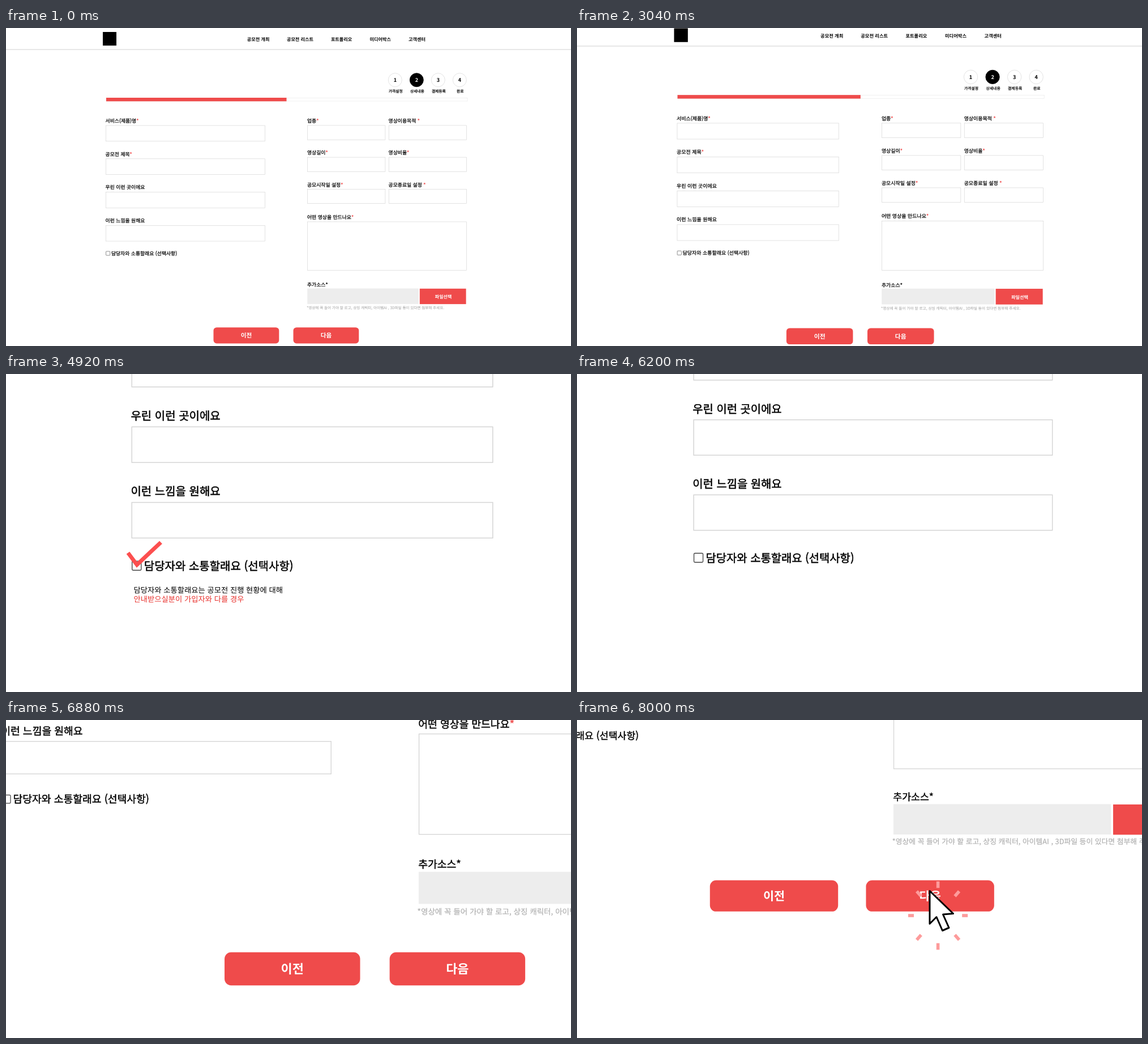
Animation, 998 px wide and 561 px high, one loop 8040 ms. Source, as an HTML page:

```html
<!DOCTYPE html>
<html lang="ko">
<head>
<meta charset="utf-8">
<title>공모전 상세내용</title>
<style>
  html, body { margin: 0; width: 100%; height: 100%; overflow: hidden; background: #fff; }
  svg { display: block; width: 100%; height: 100%; }
  text {
    font-family: "Noto Sans CJK KR", "Noto Sans CJK", "Noto Sans KR", "Noto Sans", sans-serif;
    text-rendering: geometricPrecision;
    white-space: pre;
  }
  .label { font-size: 8.82px; stroke: #000; stroke-width: .22px; }
  .label .req { fill: #ef4b4b; stroke: #ef4b4b; }
  .nav { font-size: 8.15px; font-weight: 700; text-anchor: middle; }
  .num { font-size: 9px; font-weight: 700; text-anchor: middle; }
  .step { font-size: 6.75px; text-anchor: middle; stroke: #000; stroke-width: .2px; }
  .note { font-size: 6.55px; fill: #b0b0b0; stroke: #b0b0b0; stroke-width: .1px; }
  .btn { font-size: 10.6px; font-weight: 700; text-anchor: middle; fill: #fff; }
  .file { font-size: 8px; font-weight: 700; text-anchor: middle; fill: #fff; }
  .hint { font-size: 13.32px; }
</style>
</head>
<body>
<svg viewBox="0 0 998 561">
  <g id="page"></g>
  <g id="memo">
    <path id="check" d="M215.5 315.5L231.3 336.5L273.5 297" fill="none" stroke="#fc4f4f"
      stroke-width="7" pathLength="1" stroke-dasharray="1 2"/>
    <text id="line1" class="hint" x="225.5" y="386.4"></text>
    <text id="line2" class="hint" x="225.5" y="402.4" fill="#e8302c"></text>
  </g>
  <g id="rays" fill="#fd9b9b"></g>
  <path id="cursor" d="M623 301.5V359.5L635 347.5L645.5 371.5L657 366.5L646.5 343L664.5 341.5Z"
    fill="#fff" stroke="#000" stroke-width="3" stroke-linejoin="round"/>
</svg>
<script>
const LOOP = 8040, TICK = 40, RED = '#ef4b4b';
const $ = id => document.getElementById(id);

function add(parent, tag, attrs, text) {
  const el = document.createElementNS('http://www.w3.org/2000/svg', tag);
  for (const k in attrs) el.setAttribute(k, attrs[k]);
  if (text) el.textContent = text;
  parent.append(el);
  return el;
}

const page = $('page');
const rect = (x, y, width, height, more) => add(page, 'rect', { x, y, width, height, ...more });
const write = (cls, x, y, s) => add(page, 'text', { class: cls, x, y }, s);
const field = (x, y, w, h) => rect(x, y, w, h, { fill: '#fff', stroke: '#d4d4d4', 'stroke-width': .65 });

// A trailing "*" marks a required field and is drawn in red.
function label(x, y, s) {
  const required = s.endsWith('*');
  const el = write('label', x, y, required ? s.slice(0, -1) : s);
  if (required) add(el, 'tspan', { class: 'req' }, '*');
}

function buildPage() {
  rect(0, 37.2, 998, 1.6, { fill: '#e2e2e2' });
  rect(171, 7, 24, 24, { fill: '#000' });
  [['공모전 개최', 445.6], ['공모전 리스트', 519.5], ['포트폴리오', 592.6], ['미디어박스', 661.2], ['고객센터', 726]]
    .forEach(([s, x]) => write('nav', x, 23.2, s));

  ['가격설정', '상세내용', '결제등록', '완료'].forEach((s, i) => {
    const cx = 687.3 + i * 38, on = i === 1;
    add(page, 'circle', { cx, cy: 91.7, r: 12, fill: on ? '#000' : '#fff', stroke: on ? '#000' : '#dcdcdc', 'stroke-width': .8 });
    add(page, 'text', { class: 'num', x: cx, y: 95.1, fill: on ? '#fff' : '#000' }, i + 1);
    write('step', cx + 1, 114.1, s);
  });

  rect(177, 123.4, 638, 5.6, { fill: '#fff', stroke: '#e6e6e6', 'stroke-width': .6 });
  rect(177, 123, 318.5, 6.3, { fill: RED });

  ['서비스(제품)명*', '공모전 제목*', '우린 이런 곳이에요', '이런 느낌을 원해요'].forEach((s, i) => {
    label(175.6, 166.9 + i * 58.6, s);
    field(176.4, 172 + i * 58.77, 281.1, 27.7);
  });
  rect(176.6, 394, 7.1, 7.1, { rx: .8, fill: '#fff', stroke: '#444', 'stroke-width': .6 });
  label(185.9, 400.8, '담당자와 소통할래요 (선택사항)');

  [['업종*', '영상이용목적 *'], ['영상길이*', '영상비율*'], ['공모시작일 설정*', '공모종료일 설정 *']]
    .forEach((pair, row) => pair.forEach((s, col) => {
      const x = 532.6 + col * 143.6;
      label(x - .6, 166.9 + row * 56.3, s);
      field(x, 171.9 + row * 56.2, 137.3, 25.3);
    }));
  label(532, 336.8, '어떤 영상을 만드나요*');
  field(532.6, 341.9, 281, 85.7);

  write('label', 532, 456.4, '추가소스*');
  rect(532.3, 459.5, 196.5, 27.4, { fill: '#ededed' });
  rect(730.8, 459.8, 81.8, 27.3, { fill: RED });
  write('file', 772.6, 477.1, '파일선택');
  write('note', 531.2, 495.8, '*영상에 꼭 들어 가야 할 로고, 상징 캐릭터, 아이템AI , 3D파일 등이 있다면 첨부해 주세요.');

  [['이전', 366.5], ['다음', 507.5]].forEach(([s, x]) => {
    rect(x, 528.2, 115.8, 28.2, { rx: 5.6, fill: RED });
    write('btn', x + 57.9, 546, s);
  });
}

const rays = Array.from({ length: 8 }, (_, i) => {
  const flat = i % 4 === 0;
  return add($('rays'), 'rect', { x: flat ? -5 : -5.8, y: -2.8, width: flat ? 10 : 11.6, height: 5.6 });
});

const clamp = v => Math.max(0, Math.min(1, v));
const ease = v => v < .5 ? 2 * v * v : 1 - 2 * (1 - v) ** 2;
const span = (t, start, length) => clamp((t - start) / length);

// Camera views: scale, x, y
const FULL = [1, 0, 0], FORM = [2.268, -177.8, -563.4], NEXT = [1.955, -481.7, -749.9];
const MOVES = [
  { start: 3000, length: 520, from: FULL, to: FORM },
  { start: 5960, length: 1600, from: FORM, to: NEXT },
];

const LINES = [
  { el: $('line1'), rate: 49, text: '담당자와 소통할래요는 공모전 진행 현황에 대해' },
  { el: $('line2'), rate: 66, text: '안내받으실분이 가입자와 다를 경우 체크해 주세요' },
];
const TYPE_START = 3695;

function render(t) {
  const move = MOVES[t < MOVES[1].start ? 0 : 1];
  const p = ease(span(t, move.start, move.length));
  const [s, x, y] = move.from.map((v, i) => v + (move.to[i] - v) * p);
  page.setAttribute('transform', `translate(${x} ${y}) scale(${s})`);

  $('memo').style.display = t >= 3560 && t < 5920 ? '' : 'none';
  $('check').setAttribute('stroke-dashoffset', 1 - span(t, 3560, 480));
  for (const { el, rate, text } of LINES)
    el.textContent = text.slice(0, Math.max(0, Math.floor((t - TYPE_START) / rate)));

  $('cursor').style.opacity = span(t, 7560, 160);
  const burst = span(t, 7720, 280), reach = .55 + .45 * burst;
  $('rays').style.opacity = burst;
  rays.forEach((ray, i) => {
    const a = i * Math.PI / 4;
    const dx = 47.6 * reach * Math.cos(a), dy = 54.5 * reach * Math.sin(a);
    const turn = Math.atan2(dy, dx) * 180 / Math.PI;
    ray.setAttribute('transform', `translate(${637.6 + dx} ${345 + dy}) rotate(${turn})`);
  });
}

buildPage();
const began = performance.now();
function loop() {
  const t = (performance.now() - began) % LOOP;
  render(Math.floor(t / TICK) * TICK);
  requestAnimationFrame(loop);
}
loop();
</script>
</body>
</html>
```
